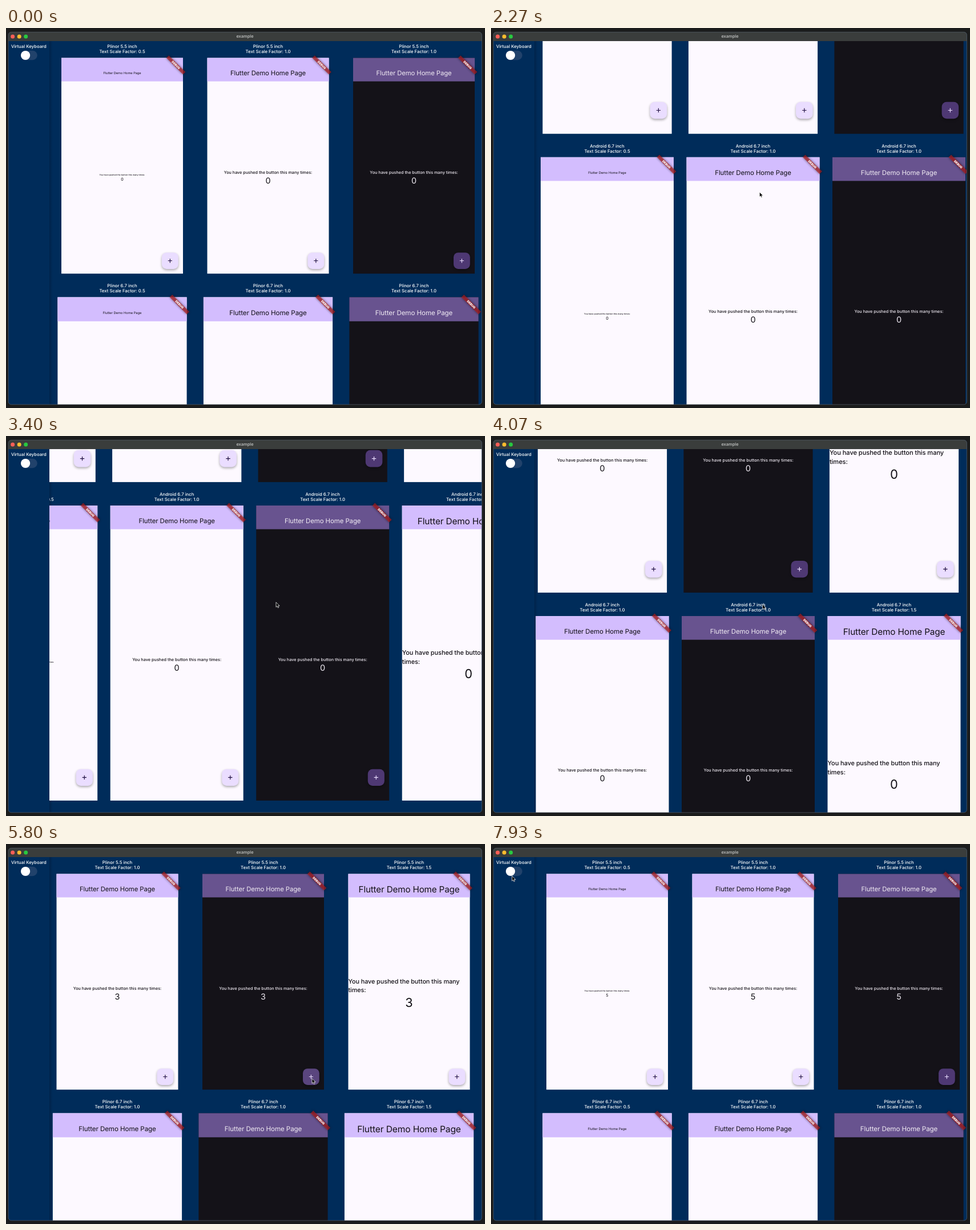
These frames come from a looping animation (839x667 px, 8 s). An HTML page:

```html
<!DOCTYPE html>
<html lang="en">
<head>
<meta charset="utf-8">
<title>example</title>
<style>
  html, body { margin: 0; width: 100%; height: 100%; overflow: hidden; background: #1b1c1c; }
  svg { display: block; width: 839px; height: 667px; }
  text { font-family: Inter, Roboto, sans-serif; text-rendering: geometricPrecision; white-space: pre; }
  .label { font-size: 7.75px; font-weight: 500; fill: #fff; text-anchor: middle; }
  .mid { text-anchor: middle; }
</style>
</head>
<body>
<svg viewBox="0 0 839 667">
  <defs>
    <clipPath id="window"><rect x="4" y="7" width="829.5" height="654" rx="5"/></clipPath>
    <clipPath id="view"><rect x="76" y="23" width="757.5" height="638"/></clipPath>
    <filter id="soft" x="-50%" y="-60%" width="200%" height="220%"><feGaussianBlur stdDeviation="3.8"/></filter>
    <linearGradient id="edge">
      <stop offset="0" stop-color="#001533" stop-opacity=".4"/>
      <stop offset="1" stop-color="#001533" stop-opacity="0"/>
    </linearGradient>
  </defs>
  <rect width="839" height="667" fill="#1b1c1c"/>
  <g clip-path="url(#window)">
    <rect x="4" y="7" width="830" height="655" fill="#002c5a"/>
    <rect x="76" y="23" width="6" height="638" fill="url(#edge)"/>
    <g clip-path="url(#view)"><g id="board"></g></g>
    <rect x="4" y="7" width="830" height="16" fill="#3a3d3c"/>
    <circle cx="11.7" cy="14.9" r="3.5" fill="#fe5f57"/>
    <circle cx="23.2" cy="14.9" r="3.5" fill="#febc2e"/>
    <circle cx="34.7" cy="14.9" r="3.5" fill="#28c840"/>
    <text x="418.5" y="17.2" class="mid" font-size="7.4" font-weight="600" fill="#b9bbba">example</text>
    <text x="39.8" y="35.3" class="label">Virtual Keyboard</text>
    <rect x="25.8" y="39.8" width="29" height="16.4" rx="8.2" fill="#21426b"/>
    <circle cx="34.1" cy="48" r="8.1" fill="#fff"/>
  </g>
  <rect x="4.2" y="7.2" width="829.2" height="653.7" rx="5" fill="none" stroke="#56616b" stroke-width=".7"/>
  <path id="cursor" d="M0 0V8.6L2 6.8L3.3 9.8L4.8 9.1L3.5 6.2H6.2Z" fill="#000" stroke="#fff" stroke-width=".75" stroke-linejoin="round"/>
</svg>
<script>
const LOOP = 8000;
const board = document.getElementById('board');
const cursor = document.getElementById('cursor');

const light = { page: '#fdf9ff', bar: '#d3bdfe', text: '#131116', fab: '#eaddff', icon: '#1d0d40' };
const dark = { page: '#141218', bar: '#68538f', text: '#f0ebf3', fab: '#4e3873', icon: '#eaddff' };

// Sizes are in each device's own units; k scales them to the stage.
const devices = [
  { name: 'Plinor 5.5 inch', w: 414, h: 736, k: .5145, top: 52.5, inset: 0 },
  { name: 'Plinor 6.7 inch', w: 428, h: 926, k: .5285, top: 472.5, inset: 34 },
  { name: 'Android 6.7 inch', w: 448, h: 996, k: .52, top: 1003, inset: 34 }
];
const columns = [
  { factor: .5, theme: light }, { factor: 1, theme: light },
  { factor: 1, theme: dark }, { factor: 1.5, theme: light }
];

function text(str, x, mid, size, spacing, fill, attrs = 'class="mid"') {
  return `<text x="${x}" y="${mid + .365 * size}" font-size="${size}" letter-spacing="${spacing}" fill="${fill}" ${attrs}>${str}</text>`;
}

function body(d, factor, color) {
  const wraps = factor > 1;
  const lines = wraps
    ? ['You have pushed the button this many', 'times:']
    : ['You have pushed the button this many times:'];
  const size = 14 * factor, line = 20 * factor, numLine = 36 * factor;
  const start = (80 + d.h - line * lines.length - numLine) / 2;
  const rows = lines.map((s, i) => text(s, wraps ? 0 : d.w / 2, start + line * (i + .5),
    size, .25 - .0177 * size, color, `font-weight="500" class="${wraps ? 'start' : 'mid'}"`));
  const numMid = start + line * lines.length + numLine / 2;
  return rows.join('') + text('0', d.w / 2, numMid, 28 * factor, 0, color, 'class="mid count"');
}

function fab(d, theme, pressable) {
  const box = 'x="-28" y="-28" width="56" height="56" rx="16"';
  return `<g transform="translate(${d.w - 44} ${d.h - 44 - d.inset})">
    <rect ${box} transform="translate(0 4)" fill="#000" opacity=".33" filter="url(#soft)"/>
    <rect ${box} fill="${theme.fab}"/>
    ${pressable ? `<rect id="ripple" ${box} fill="#eaddff" opacity="0"/>` : ''}
    <path d="M-7 0H7M0 -7V7" stroke="${theme.icon}" stroke-width="2.2"/></g>`;
}

function banner(d) {
  const strip = 'x="-40" y="28" width="80" height="12"';
  return `<g transform="translate(${d.w} 0) rotate(45)">
    <rect ${strip} fill="#000" opacity=".5" filter="url(#soft)"/>
    <rect ${strip} fill="#b71c1c" opacity=".65"/>
    ${text('DEBUG', 0, 34, 10.2, 0, '#fff', 'class="mid" font-weight="900"')}</g>`;
}

function phone(d, { factor, theme }, col) {
  const cx = 203.5 + 255.5 * col;
  const titleSize = 22 * Math.min(factor, 1.34);
  return `<text x="${cx}" y="${d.top - 17.2}" class="label">${d.name}</text>
    <text x="${cx}" y="${d.top - 8.1}" class="label">Text Scale Factor: ${factor.toFixed(1)}</text>
    <g transform="translate(${cx - d.w * d.k / 2} ${d.top}) scale(${d.k})">
      <rect width="${d.w}" height="${d.h}" fill="${theme.page}"/>
      <rect width="${d.w}" height="80" fill="${theme.bar}"/>
      ${text('Flutter Demo Home Page', d.w / 2, 52, titleSize, -.0085 * titleSize, theme.text)}
      ${body(d, factor, theme.text)}
      ${fab(d, theme, d === devices[0] && col === 2)}
      ${banner(d)}
    </g>`;
}

board.innerHTML = devices.map(d => columns.map((c, i) => phone(d, c, i)).join('')).join('');
const counts = board.querySelectorAll('.count');
const ripple = document.getElementById('ripple');

const clamp = u => Math.min(1, Math.max(0, u));
const easeOut = u => 1 - (1 - u) ** 2;
const easeInOut = u => u < .5 ? 2 * u * u : 1 - 2 * (1 - u) ** 2;
const span = (t, from, to, ease = easeInOut) => ease(clamp((t - from) / (to - from)));

const clicks = [5130, 5400, 5730, 6070, 6370];
const pointer = [
  [700, 471.5, 292.5], [1730, 471.5, 292.5], [2530, 470, 286.8], [2730, 470, 286.8],
  [2930, 473, 291.8], [3400, 473, 291.8], [4130, 475.7, 295.6], [4600, 475.7, 295.6],
  [5050, 536, 411.6], [7330, 536, 411.6], [7900, 36.8, 56.2], [LOOP, 36.8, 56.2]
];

function pointerAt(t) {
  const i = Math.max(1, pointer.findIndex(p => p[0] >= t));
  const [t0, x0, y0] = pointer[i - 1], [t1, x1, y1] = pointer[i];
  const u = span(t, t0, t1);
  return [x0 + (x1 - x0) * u, y0 + (y1 - y0) * u];
}

function render(t) {
  const x = 264 * (span(t, 3230, 3690, easeOut) - span(t, 6800, 7283));
  const y = 881 * (span(t, 1530, 2510) - span(t, 3850, 4516));
  board.setAttribute('transform', `translate(${-x} ${-y})`);

  const past = clicks.filter(c => c <= t);
  counts.forEach(n => { n.textContent = past.length; });
  const since = past.length ? t - past[past.length - 1] : LOOP;
  ripple.setAttribute('opacity', .12 * clamp(1 - since / 220));

  cursor.setAttribute('visibility', t < 700 ? 'hidden' : 'visible');
  cursor.setAttribute('transform', `translate(${pointerAt(t)})`);
}

const began = performance.now();
function tick() {
  render((performance.now() - began) % LOOP);
  requestAnimationFrame(tick);
}
tick();
</script>
</body>
</html>
```
